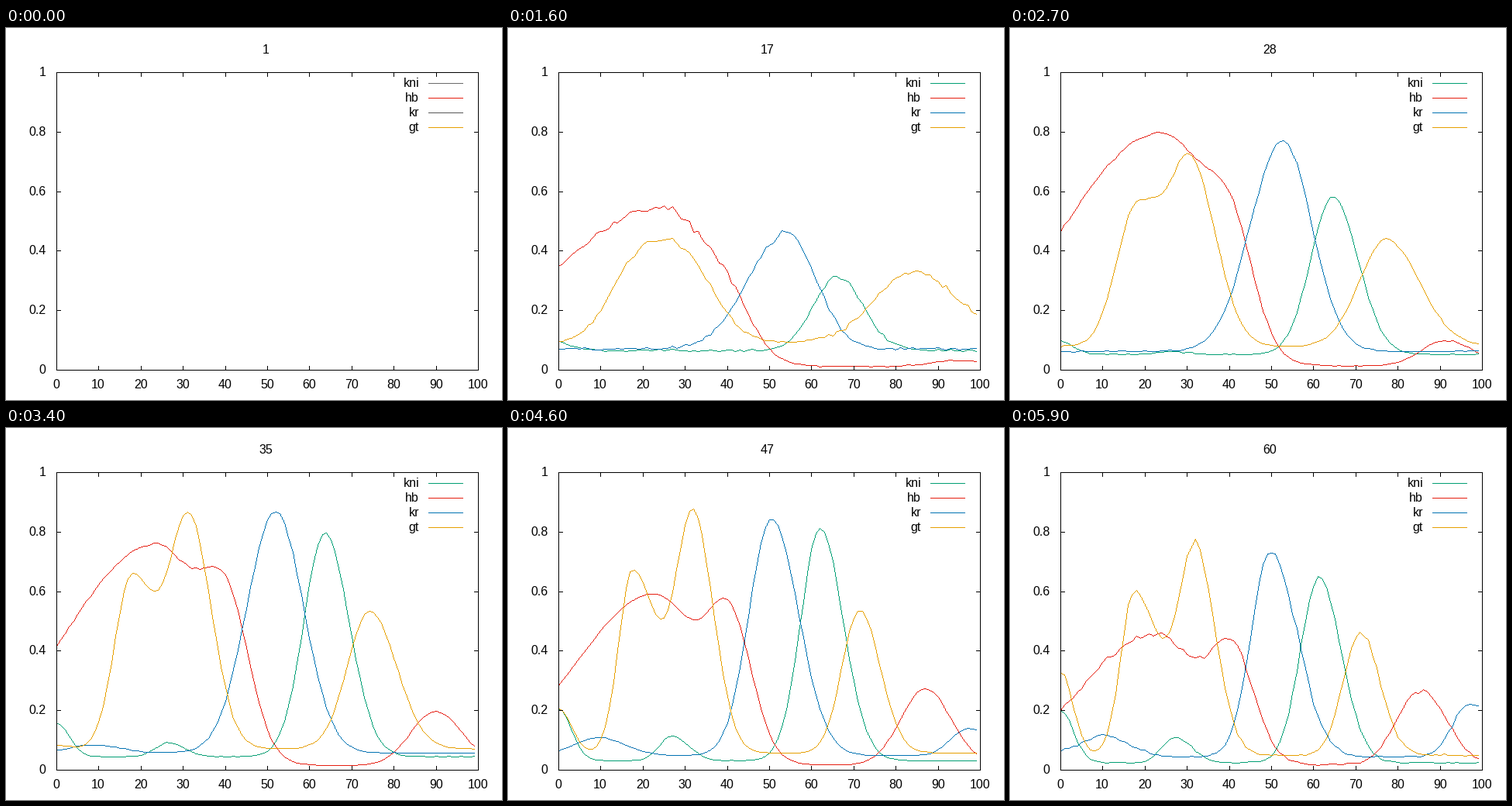
Animation of 640 by 480 pixels, one loop 6000 ms. Source, as a matplotlib script:

```python
import numpy as np
import matplotlib.pyplot as plt
from matplotlib.animation import FuncAnimation

W, H, DPI = 640, 480, 80
FRAMES, INTERVAL = 60, 100
LEFT, RIGHT, TOP, BOTTOM = 65, 609, 57, 441
PX = 72 / DPI

plt.rcParams["font.family"] = "Liberation Sans"
plt.rcParams["path.simplify"] = False

cells = np.arange(100)
steps = np.arange(FRAMES)
rng = np.random.default_rng(4)

# Moments between which heights change evenly; peaks drift from START to END
MOMENTS = (0, 16, 27, 40, 52)
START, END = MOMENTS[1], MOMENTS[-1]


def bump(t, centre, left, right, heights, bend=1):
    """Bell with its own width on each side; each pair glides first to last."""
    u = np.clip((t - START) / (END - START), 0, 1)
    u = 1 - (1 - u) ** bend
    c, l, r = (a + (b - a) * u for a, b in (centre, left, right))
    height = np.interp(t, MOMENTS, (0, *heights))
    d = cells - c
    return height * np.exp(-0.5 * (d / np.where(d < 0, l, r)) ** 2)


def base(t, first, last):
    return min(t / 3, 1) * np.interp(t, (3, END), (first, last))


def kni(t):
    return (base(t, 0.08, 0.025)
            + bump(t, (0, 0), (3, 3), (3, 3), (0.03, 0.045, 0.17, 0.18))
            + bump(t, (26, 27), (3, 3), (3.5, 4), (0, 0.01, 0.08, 0.085))
            + bump(t, (66, 61.2), (5.6, 4.4), (6.2, 5.3),
                   (0.25, 0.53, 0.94, 0.62)))


def hb(t):
    return (base(t, 0.01, 0.018)
            + bump(t, (24, 22.5), (25, 17), (11, 11), (0.53, 0.78, 0.71, 0.44))
            + bump(t, (40.5, 41), (6.5, 4.8), (5.3, 5), (0.13, 0.33, 0.48, 0.31))
            + bump(t, (94, 85.5), (6, 5.7), (7, 6), (0.02, 0.085, 0.265, 0.25)))


def kr(t):
    return (base(t, 0.08, 0.045)
            + bump(t, (8, 10), (6, 6), (6, 6), (0, 0, 0.05, 0.07))
            + bump(t, (54, 49.7), (9, 4.5), (7, 6.3), (0.39, 0.71, 0.9, 0.69))
            + bump(t, (97, 97), (4, 4), (6, 6), (0, 0, 0, 0.18)))


def gt(t):
    return (base(t, 0.11, 0.05)
            + bump(t, (0, 0), (3, 3), (3, 3), (0, 0, 0.02, 0.28))
            + bump(t, (18.5, 17.5), (6.5, 3.2), (6, 5.8), (0.25, 0.46, 0.68, 0.55), 2)
            + bump(t, (30, 32), (6.5, 4), (7, 4.7), (0.27, 0.6, 0.89, 0.69), 2)
            + bump(t, (84, 71), (9, 4), (11, 4.7), (0.235, 0.36, 0.55, 0.41), 2))


def slow_noise(keep=0.6):
    noise = rng.normal(size=(FRAMES, len(cells)))
    for t in steps[1:]:
        noise[t] = keep * noise[t - 1] + np.sqrt(1 - keep ** 2) * noise[t]
    return noise


def levels(gene):
    """Noisy level of one gene for every step and cell."""
    clean = np.array([gene(t) for t in steps])
    strength = 0.03 * np.exp(-steps / 13) + 0.008 * np.clip((steps - 45) / 14, 0, 1)
    noisy = clean + strength[:, None] * np.sqrt(clean) * slow_noise()
    return np.clip(noisy, 0, 1)


def to_x(v):
    return np.round(LEFT + v * (RIGHT - LEFT) / 100).astype(int)


def to_y(v):
    return np.round(BOTTOM - v * (BOTTOM - TOP)).astype(int)


def stepped(level):
    """Hard-edged one pixel wide line: a short dash for every pixel."""
    xs, ys = to_x(cells), to_y(level)
    px, py = [], []
    for i in range(len(xs) - 1):
        n = max(xs[i + 1] - xs[i], abs(ys[i + 1] - ys[i])) + 1
        px.append(np.round(np.linspace(xs[i], xs[i + 1], n)))
        py.append(np.round(np.linspace(ys[i], ys[i + 1], n)))
    px, py = np.concatenate(px), np.concatenate(py) + 0.5
    gap = np.full_like(px, np.nan)
    return np.column_stack([px, px + 1, gap]).ravel(), np.repeat(py, 3)


fig = plt.figure(figsize=(W / DPI, H / DPI), dpi=DPI, facecolor="white")
ax = fig.add_axes([0, 0, 1, 1])
ax.set_xlim(0, W)
ax.set_ylim(H, 0)
ax.axis("off")


def line(xs, ys, colour="black", z=5):
    return ax.plot(xs, ys, color=colour, lw=PX, snap=False,
                   solid_capstyle="butt", zorder=z)[0]


def across(x0, x1, y, colour="black"):
    return line([x0, x1 + 1], [y + 0.5, y + 0.5], colour)


def down(x, y0, y1):
    return line([x + 0.5, x + 0.5], [y0, y1 + 1])


def label(x, y, text, align):
    """Text whose middle lies at height y."""
    return ax.text(x, y + 5, text, fontsize=16 * PX, ha=align, va="baseline",
                   color="black")


def frame_and_ticks(size=5):
    for y in (TOP, BOTTOM):
        across(LEFT, RIGHT, y)
    for x in (LEFT, RIGHT):
        down(x, TOP, BOTTOM)
    for v in range(0, 101, 10):
        x = to_x(np.float64(v))
        down(x, BOTTOM - size, BOTTOM)
        down(x, TOP, TOP + size)
        label(x, BOTTOM + 19, str(v), "center")
    for v in np.arange(6) / 5:
        y = to_y(v)
        across(LEFT, LEFT + size, y)
        across(RIGHT - size, RIGHT, y)
        label(51.5, y, f"{v:g}", "right")


# name, colour, colour of the key while empty, levels
genes = [
    ("kni", "#009e73", "#6a6a6a", levels(kni)),
    ("hb", "#e51e10", "#e51e10", levels(hb)),
    ("kr", "#0072b2", "#575757", levels(kr)),
    ("gt", "#e69f00", "#e69f00", levels(gt)),
]

frame_and_ticks()
title = label(335, 28, "1", "center")
curves, handles = [], []
for k, (name, colour, _, _) in enumerate(genes):
    y = 71 + 19 * k
    label(533, y, name, "right")
    handles.append(across(545, 589, y, colour))
    curves.append(line([], [], colour, 3))


def update(i):
    title.set_text(str(i + 1))
    for curve, handle, (_, colour, empty, level) in zip(curves, handles, genes):
        curve.set_data(*stepped(level[i]))
        handle.set_color(colour if i else empty)
    return [title, *curves, *handles]


anim = FuncAnimation(fig, update, frames=FRAMES, interval=INTERVAL,
                     repeat=True, repeat_delay=0, blit=False)
plt.show()
```
